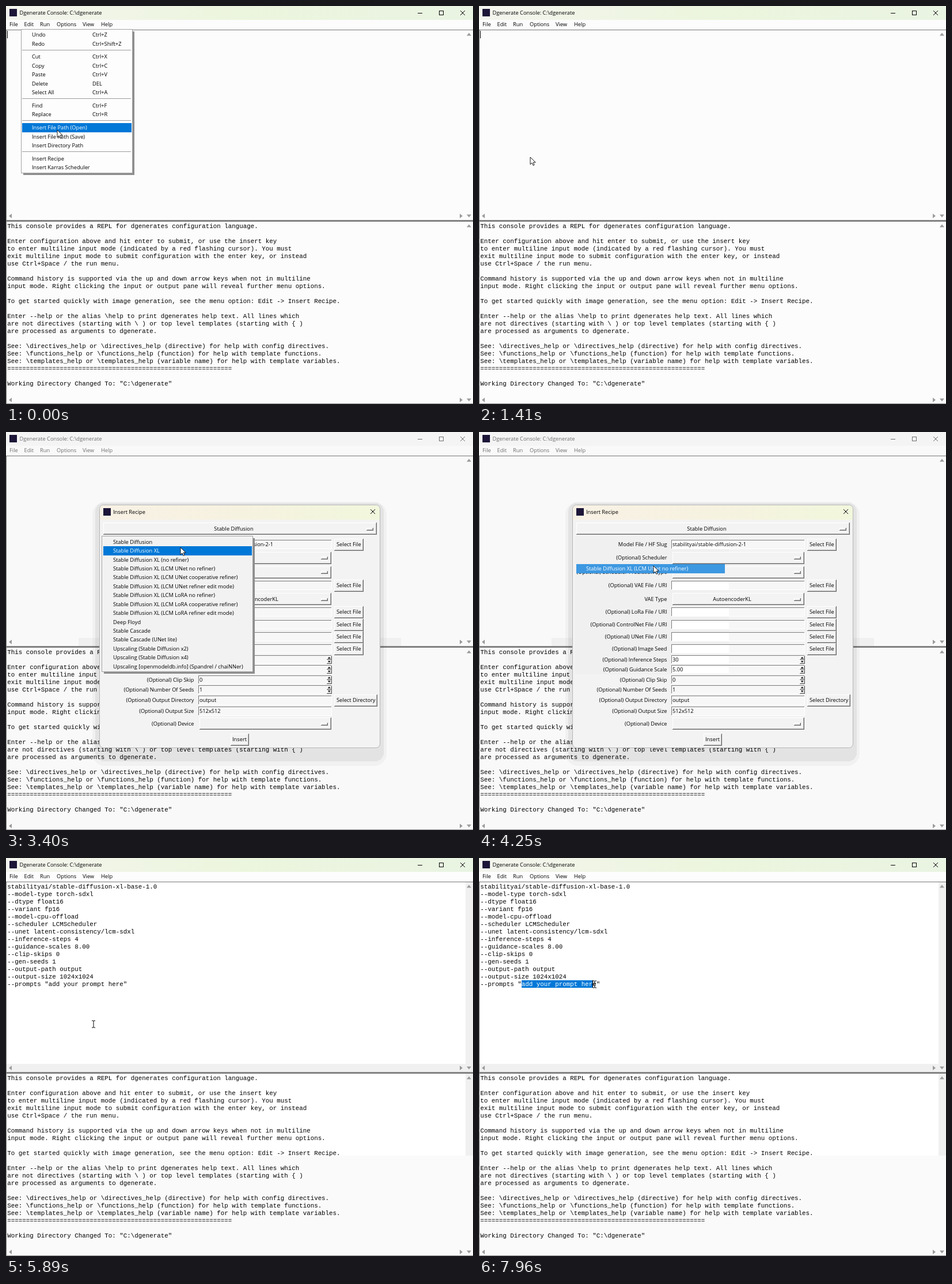
An HTML page that plays this animation: 811x690 px, repeating every 8 s.

```html
<!DOCTYPE html>
<html lang="en">
<head>
<meta charset="utf-8">
<title>Console recipe demo</title>
<style>
html, body { margin: 0; width: 100%; height: 100%; overflow: hidden; background: #fcfcfc; }
svg { display: block; width: 811px; height: 690px; }
text { white-space: pre; font-variant-ligatures: none; }
.ui { font: 9.27px "Open Sans", "Noto Sans", sans-serif; }
.mono { font: 10.83px "Liberation Mono", "Courier New", monospace; }
rect, .line { shape-rendering: crispEdges; }
.line { fill: none; }
.fresh { display: none; }
.done .fresh { display: inline; }
</style>
</head>
<body>
<svg id="stage" viewBox="0 0 811 690" xmlns="http://www.w3.org/2000/svg"></svg>
<script>
const LOOP = 8000, BLUE = '#0078d7', PALE_BLUE = '#3d98e1';

// ---- drawing helpers (text is placed by its vertical centre) ----
const rect = (x, y, w, h, fill, more = '') =>
  `<rect x="${x}" y="${y}" width="${w}" height="${h}" fill="${fill}" ${more}/>`;
const line = (d, color, width = 1) =>
  `<path class="line" d="${d}" stroke="${color}" stroke-width="${width}"/>`;
const ui = (x, y, s, more = '') => `<text class="ui" x="${x}" y="${y + 3.2}" ${more}>${s}</text>`;
const mono = (x, y, s, more = '') => `<text class="mono" x="${x}" y="${y + 3.2}" ${more}>${s}</text>`;
const group = (id, body) => `<g id="${id}">${body}</g>`;
const mid = 'text-anchor="middle"';

const bevel = (x, y, w, h, light, dark, fill) =>
  rect(x, y, w, h, fill) +
  line(`M${x + .5} ${y + h}V${y + .5}H${x + w}`, light) +
  line(`M${x} ${y + h - .5}H${x + w - .5}V${y}`, dark);
const raised = (x, y, w, h, fill = '#f3f3f3') =>
  bevel(x, y, w, h, '#fff', '#666', fill) +
  line(`M${x + 1} ${y + h - 1.5}H${x + w - 1.5}V${y + 1}`, '#b4b4b4');
const sunken = (x, y, w, h, fill) => bevel(x, y, w, h, '#7c7c7c', '#fff', fill);

const tri = (x, y, turn, size = 1, color = '#9b9b9b') =>
  `<path d="M-4 2.5L0 -2.5L4 2.5Z" fill="${color}" transform="translate(${x} ${y}) rotate(${turn}) scale(${size})"/>`;
const cross = (x, y) => `<path d="M${x - 4} ${y - 4}l8 8m0 -8l-8 8" stroke="currentColor" fill="none"/>`;
const icon = (x, y) => rect(x, y, 13, 13, '#1d1638');

// ---- main window ----
const intro = String.raw`This console provides a REPL for dgenerates configuration language.

Enter configuration above and hit enter to submit, or use the insert key
to enter multiline input mode (indicated by a red flashing cursor). You must
exit multiline input mode to submit configuration with the enter key, or instead
use Ctrl+Space / the run menu.

Command history is supported via the up and down arrow keys when not in multiline
input mode. Right clicking the input or output pane will reveal further menu options.

To get started quickly with image generation, see the menu option: Edit -> Insert Recipe.

Enter --help or the alias \help to print dgenerates help text. All lines which
are not directives (starting with \ ) or top level templates (starting with { )
are processed as arguments to dgenerate.

See: \directives_help or \directives_help (directive) for help with config directives.
See: \functions_help or \functions_help (function) for help with template functions.
See: \templates_help or \templates_help (variable name) for help with template variables.
${'='.repeat(60)}

Working Directory Changed To: "C:\dgenerate"`;

const config = `stabilityai/stable-diffusion-xl-base-1.0
--model-type torch-sdxl
--dtype float16
--variant fp16
--model-cpu-offload
--scheduler LCMScheduler
--unet latent-consistency/lcm-sdxl
--inference-steps 4
--guidance-scales 8.00
--clip-skips 0
--gen-seeds 1
--output-path output
--output-size 1024x1024
--prompts "add your prompt here"`;

const lines = (s, y) => s.split('\n').map((l, i) => mono(2.3, y + 13 * i, l)).join('');

const bars = [['File', 6], ['Edit', 31.5], ['Run', 59], ['Options', 88], ['View', 133], ['Help', 165]];

const mainWindow =
  rect(0, 0, 811, 690, '#fcfcfc', 'id="back"') +
  rect(0, 0, 811, 24, 'url(#green)', 'id="titleBar"') +
  group('panes',
    rect(0, 24, 811, 17, '#fdfdfd') + rect(0, 41, 811, 475, '#fff') +
    rect(798, 42, 13, 474, '#f0f0f0') + rect(0, 357, 811, 14, '#f0f0f0') +
    rect(0, 516, 811, 174, '#fafafa')) +
  icon(6, 5) +
  group('caption',
    ui(23.5, 12, 'Dgenerate Console: C:\\dgenerate', 'fill="currentColor"') +
    line('M715 12.5h8M752.5 8.5h7v7h-7z', 'currentColor') + cross(793, 12)) +
  group('menuBar', bars.map(([s, x]) => ui(x, 32, s, 'fill="currentColor"')).join('')) +
  rect(0, 41, 811, 1, '#777') + rect(0, 41, 1, 649, '#777') +
  rect(0, 371, 811, 3, '#828282') + rect(0, 689, 811, 1, '#8a8a8a') +
  [[49, 364], [381, 683]].map(([a, b]) =>
    tri(804, a, 0) + tri(804, b, 180) + tri(7.5, b, -90) + tri(790.5, b, 90)).join('') +
  lines(intro, 382) +
  group('config', lines(config, 50)) +
  rect(2, 43, 1, 13, '#000', 'id="caret"') +
  group('selection',
    rect(74, 212, 0, 13, BLUE) + mono(73.8, 219, '', 'fill="#fff"') + rect(74, 212, 1, 13, '#000'));

// ---- drop-down menus ----
const popup = (x, y, w, h, fill) =>
  rect(x + 3, y + 3, w, h, '#8e8e8e') + rect(x, y, w, h, fill, 'stroke="#a3a3a3"');

const editItems = [
  [50, 'Undo', 'Ctrl+Z'], [65.5, 'Redo', 'Ctrl+Shift+Z'], [88, 'Cut', 'Ctrl+X'],
  [103.5, 'Copy', 'Ctrl+C'], [119, 'Paste', 'Ctrl+V'], [134.5, 'Delete', 'DEL'],
  [150, 'Select All', 'Ctrl+A'], [172.5, 'Find', 'Ctrl+F'], [188, 'Replace', 'Ctrl+R'],
  [211, 'Insert File Path (Open)'], [226.5, 'Insert File Path (Save)'],
  [242, 'Insert Directory Path'], [264.5, 'Insert Recipe'], [280, 'Insert Karras Scheduler']];
const editMenu = popup(26.5, 40.5, 193, 249, '#fdfdfd') +
  [76, 160, 198, 252].map(y => rect(28, y, 189, 1, '#9c9c9c')).join('') +
  editItems.map(([y, s, key = '']) => ui(45, y, s) + ui(150, y, key)).join('');

const XL = 'Stable Diffusion XL';
const recipes = ['Stable Diffusion', XL, `${XL} (no refiner)`,
  ...['UNet', 'LoRA'].flatMap(k =>
    ['no refiner', 'cooperative refiner', 'refiner edit mode'].map(m => `${XL} (LCM ${k} ${m})`)),
  'Deep Floyd', 'Stable Cascade', 'Stable Cascade (UNet lite)',
  'Upscaling (Stable Diffusion x2)', 'Upscaling (Stable Diffusion x4)',
  'Upscaling [openmodeldb.info] (Spandrel / chaiNNer)'
].map((s, i) => [190.5 + 15.43 * i, s]);
const recipeMenu = popup(166.5, 180.5, 262, 235, '#f2f2f2') +
  recipes.map(([y, s]) => ui(186, y, s)).join('');

const hover = rect(0, 0, 0, 15.5, BLUE) + ui(0, 0, '', 'fill="#fff"');

// ---- recipe dialog ----
const button = (x, y, w, s) => raised(x, Math.round(y - 10), w, 21) + ui(x + 4, y, s);
const option = (x, y, w, s) => raised(x, Math.round(y - 10.5), w, 21) +
  raised(x + w - 18, Math.round(y - 2), 12, 5) + ui(x + w / 2 - 11, y, s, mid);

function dialog(id, bottom, labelEnd, left, body, field, recipe, rows) {
  const w = 566 - left;
  const row = ([y, label, kind, value = '']) => {
    const name = ui(labelEnd, y, label, 'text-anchor="end"');
    if (kind === 'option') return name + option(left + 2, y, 563 - left, value);
    const h = kind === 'spin' ? 15 : 16, top = Math.round(y - 8);
    let out = name + sunken(left, top, w, h, field);
    if (y < 420) out += rect(left + 1, top + 1, 433 - left, h - 2, '#fff', 'class="fresh"');
    out += ui(left + 2, y, value);
    if (kind === 'spin') out += raised(557, top + 1, 9, 7) + raised(557, top + 8, 9, 7) +
      tri(561.2, y - 3.8, 0, .6, '#111') + tri(561.2, y + 3.2, 180, .6, '#111');
    if (kind === 'file') out += button(570, y, 51, 'Select File');
    if (kind === 'folder') out += button(570, y, 75, 'Select Directory');
    return out;
  };
  const h = bottom - 126, y = bottom - 14.5, top = Math.round(y - 10);
  return group(id,
    rect(126, 357, 560, 14, '#000', 'opacity=".035"') +
    rect(150, 121, 511, h + 37, '#000', 'rx="22" opacity=".03"') +
    rect(155, 123, 501, h + 27, '#000', 'rx="15" opacity=".06"') +
    rect(162.5, 126.5, 487, h, body, 'rx="7" stroke="#b5b5b5" style="shape-rendering:auto"') +
    '<path d="M163 152V134a7 7 0 0 1 7 -7H642a7 7 0 0 1 7 7V152Z" fill="url(#cream)"/>' +
    icon(169, 132) +
    '<g class="head">' + ui(186, 139, 'Insert Recipe', 'fill="currentColor"') + cross(637, 138) + '</g>' +
    rect(167, 180, 267, 240, '#f0f0f0', 'class="fresh"') +
    option(169, 167.5, 475, recipe) + rows.map(row).join('') +
    `<g class="up">${raised(390, top, 32, 21) + ui(405.5, y, 'Insert', mid)}</g>` +
    `<g class="down">${bevel(390, top, 32, 21, '#666', '#fff', body) + ui(406.5, y + .8, 'Insert', mid)}</g>`);
}

const opt = s => `(Optional) ${s}`;
const formSD = dialog('formSD', 547, 326.5, 334, '#f3f3f3', '#f7f7f7', 'Stable Diffusion', [
  [195, 'Model File / HF Slug', 'file', 'stabilityai/stable-diffusion-2-1'],
  [218, opt('Scheduler'), 'option'], [243, opt('Scheduler Prediction Type'), 'option'],
  [266, opt('VAE File / URI'), 'file'], [289.5, 'VAE Type', 'option', 'AutoencoderKL'],
  [312, opt('LoRa File / URI'), 'file'], [333.5, opt('ControlNet File / URI'), 'file'],
  [354.5, opt('UNet File / URI'), 'file'], [376, opt('Image Seed'), 'file'],
  [395, opt('Inference Steps'), 'spin', '30'], [412, opt('Guidance Scale'), 'spin', '5.00'],
  [429.5, opt('Clip Skip'), 'spin', '0'], [446.5, opt('Number Of Seeds'), 'spin', '1'],
  [465, opt('Output Directory'), 'folder', 'output'], [484, opt('Output Size'), 'entry', '512x512'],
  [505.5, opt('Device'), 'option']]);
const formXL = dialog('formXL', 497, 304, 312, '#f6f6f6', '#fbfbfb', recipes[3][1], [
  [195, 'Model File / HF Slug', 'file', 'stabilityai/stable-diffusion-xl-base-1.0'],
  [216, opt('VAE File / URI'), 'file'], [239, 'VAE Type', 'option', 'AutoencoderKL'],
  [262, opt('LoRa File / URI'), 'file'], [283, opt('ControlNet File / URI'), 'file'],
  [304, opt('UNet File / URI'), 'file', 'latent-consistency/lcm-sdxl'],
  [325, opt('Image Seed'), 'file'],
  [344.5, opt('Inference Steps'), 'spin', '4'], [362, opt('Guidance Scale'), 'spin', '8.00'],
  [379, opt('Clip Skip'), 'spin', '0'], [396, opt('Number Of Seeds'), 'spin', '1'],
  [415, opt('Output Directory'), 'folder', 'output'], [434, opt('Output Size'), 'entry', '1024x1024'],
  [455, opt('Device'), 'option']]);

// ---- pointers ----
const arrow = '<path d="M0 0V12.6L3 9.9L5 14.4L7.1 13.5L5.1 9.1H9.2Z" fill="#fff" stroke="#000" stroke-width=".9"/>';
const beam = '<path d="M-3 -6H-.9L0 -5.2L.9 -6H3M0 -5.2V5.2M-3 6H-.9L0 5.2L.9 6H3" fill="none" stroke="#000"/>';

const stops = (id, ...colors) => `<linearGradient id="${id}">` + colors.map((c, i) =>
  `<stop offset="${i / (colors.length - 1)}" stop-color="${c}"/>`).join('') + '</linearGradient>';

const $ = id => document.getElementById(id);
$('stage').innerHTML = `<defs>${stops('green', '#f4f5ee', '#ecf5dd', '#e9f4e2')}${
  stops('cream', '#f8f1e5', '#f6f2e0', '#f1f7dc')}</defs>` +
  mainWindow + group('editMenu', editMenu) + formSD + formXL + group('recipeMenu', recipeMenu) +
  group('hover', hover) + group('arrow', arrow) + group('beam', beam);

// ---- motion: time, pointer x, pointer y ----
const path = [
  [0, 89, 215], [160, 89, 224], [300, 89, 239], [440, 89, 253], [740, 89, 259], [870, 89, 262],
  [1430, 118, 248], [1570, 190, 216], [1700, 262, 186], [1840, 297, 173], [1980, 303, 171],
  [3120, 303, 178], [3260, 303, 187], [3400, 303, 200], [3530, 303, 213], [3670, 303, 225], [3810, 303, 232],
  [4540, 318, 275], [4680, 357, 370], [4810, 390, 453], [4940, 401, 479],
  [5500, 372, 452], [5630, 288, 385], [5760, 196, 315], [5890, 152, 288],
  [6010, 120, 258], [6150, 86, 226], [6280, 75, 219],
  [6400, 80, 219], [6540, 92, 219], [6690, 107, 219], [6830, 124, 219], [6980, 142, 219],
  [7120, 160, 219], [7270, 176, 219], [7410, 187, 219],
  [7560, 190, 219], [7690, 194, 219], [7830, 198, 219], [7960, 201, 219]];

const show = (el, on) => { el.style.display = on ? 'inline' : 'none'; };

function drawHover(t, y) {
  const inEdit = t < 1290, live = t < 1140 || (t >= 2410 && t < 4250);
  const on = inEdit || (t >= 2410 && t < 4400);
  const item = on && (inEdit ? editItems : recipes).find(i => Math.abs(i[0] - y) < 7.72);
  show($('hover'), item);
  if (!item) return;
  const [bar, label] = $('hover').children;
  bar.setAttribute('x', inEdit ? 28 : 169);
  bar.setAttribute('y', item[0] - 7.7);
  bar.setAttribute('width', inEdit ? 190 : 258);
  bar.setAttribute('fill', live ? BLUE : PALE_BLUE);
  label.setAttribute('x', inEdit ? 45 : 186);
  label.setAttribute('y', item[0] + 3.2);
  label.textContent = item[1];
}

function drawSelection(t, x) {
  const on = t >= 6400;
  show($('selection'), on);
  if (!on) return;
  const n = Math.max(0, Math.min(20, Math.floor((x - 74) / 6.5)));
  const [bar, label, caret] = $('selection').children;
  bar.setAttribute('width', n * 6.5);
  label.textContent = 'add your prompt here'.slice(0, n);
  caret.setAttribute('x', 74 + n * 6.5 - .5);
}

function draw(t) {
  const [, x, y] = path.findLast(p => p[0] <= t);
  const away = t >= 1430 && t < 5350, waking = t >= 5350 && t < 5630, settled = t >= 5630;

  $('back').setAttribute('fill', away ? '#f9f9f9' : waking ? '#fafafa' : '#fcfcfc');
  $('titleBar').setAttribute('fill', away ? '#f4f4f4' : waking ? '#fafafa' : 'url(#green)');
  $('caption').style.color = $('menuBar').style.color = away ? '#6e6e6e' : '#000';
  show($('panes'), settled);
  show($('config'), t >= 5500);
  show($('caret'), t < 440 || (t >= 740 && t < 1430));

  show($('editMenu'), t < 1140);
  show($('formSD'), t >= 1430 && t < 4540);
  show($('formXL'), t >= 4540 && t < 5630);
  $('formSD').setAttribute('opacity', t < 1570 ? .55 : 1);
  $('formXL').setAttribute('opacity', t >= 5500 ? .4 : 1);
  $('formSD').classList.toggle('done', t >= 4250);
  for (const id of ['formSD', 'formXL']) {
    $(id).querySelector('.head').style.color = waking ? '#777' : '#000';
    show($(id).querySelector('.up'), !waking);
    show($(id).querySelector('.down'), waking);
  }

  show($('recipeMenu'), t >= 2260 && t < 4250);
  $('recipeMenu').setAttribute('opacity', t < 2410 ? .6 : 1);
  drawHover(t, y);
  drawSelection(t, x);

  show($('arrow'), t < 5350);
  show($('beam'), t >= 5350);
  for (const id of ['arrow', 'beam']) $(id).setAttribute('transform', `translate(${x} ${y})`);
}

function tick() {
  draw(performance.now() % LOOP);
  requestAnimationFrame(tick);
}
tick();
</script>
</body>
</html>
```
